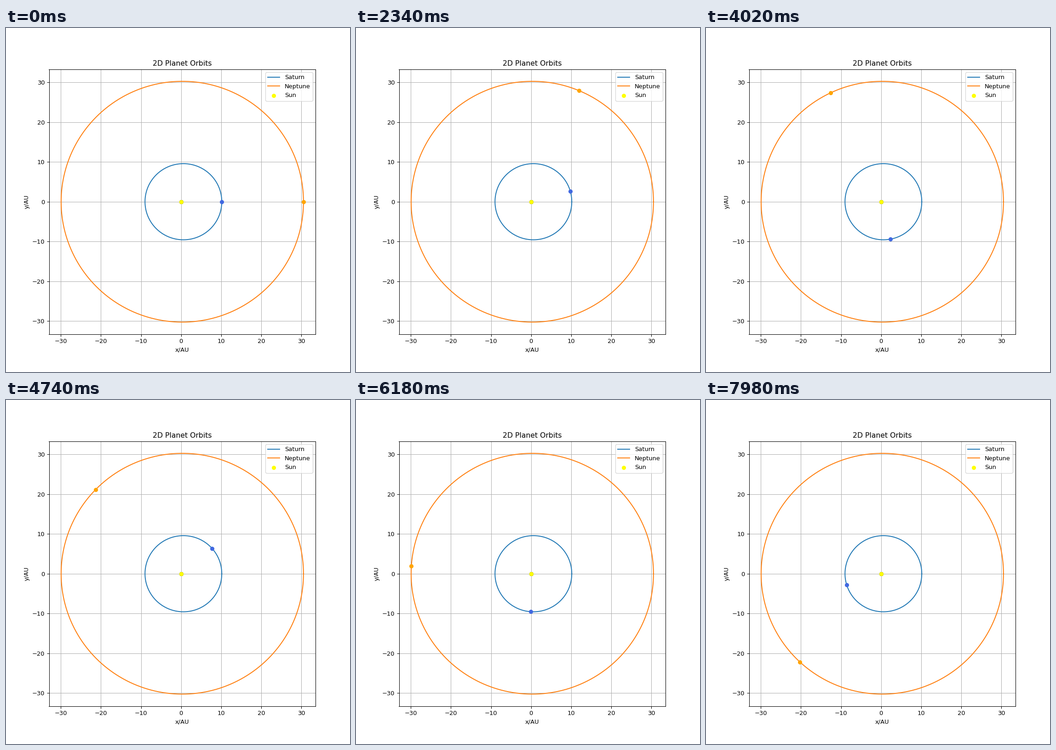
These frames come from a looping animation (748x748 px, 8 s). A matplotlib script:

```python
import numpy as np
import matplotlib.pyplot as plt
from matplotlib.animation import FuncAnimation

LOOP_MS = 8000
FRAMES = 134
YEARS_PER_FRAME = 0.7908

# name, semi-major axis (AU), eccentricity, period (years), dot colour
PLANETS = [
    ("Saturn", 9.58, 0.06, 29.63, "royalblue"),
    ("Neptune", 30.24, 0.01, 166.34, "orange"),
]


def orbit(a, ecc, theta):
    """Ellipse with the Sun at one focus and aphelion at theta = 0."""
    r = a * (1 - ecc**2) / (1 - ecc * np.cos(theta))
    return r * np.cos(theta), r * np.sin(theta)


fig, ax = plt.subplots(figsize=(8, 8), dpi=93.5)

theta = np.linspace(0, 2 * np.pi, 1000)
for name, a, ecc, _, _ in PLANETS:
    ax.plot(*orbit(a, ecc, theta), label=name)

# the dark dot leaves a thin rim around the yellow one
ax.scatter(0, 0, color="black", zorder=3)
ax.scatter(0, 0, color="yellow", zorder=3, label="Sun")

ax.set_title("2D Planet Orbits")
ax.set_xlabel("x/AU")
ax.set_ylabel("y/AU")
ax.grid(True)
ax.legend(loc="upper right")

dots = [ax.plot([a * (1 + ecc)], [0], "o", color=color)[0]
        for _, a, ecc, _, color in PLANETS]


def update(frame):
    years = frame * YEARS_PER_FRAME
    for dot, (_, a, ecc, period, _) in zip(dots, PLANETS):
        x, y = orbit(a, ecc, 2 * np.pi * years / period)
        dot.set_data([x], [y])
    return dots


anim = FuncAnimation(fig, update, frames=FRAMES, interval=LOOP_MS / FRAMES,
                     init_func=lambda: update(0), repeat=True, repeat_delay=0)
plt.show()
```
